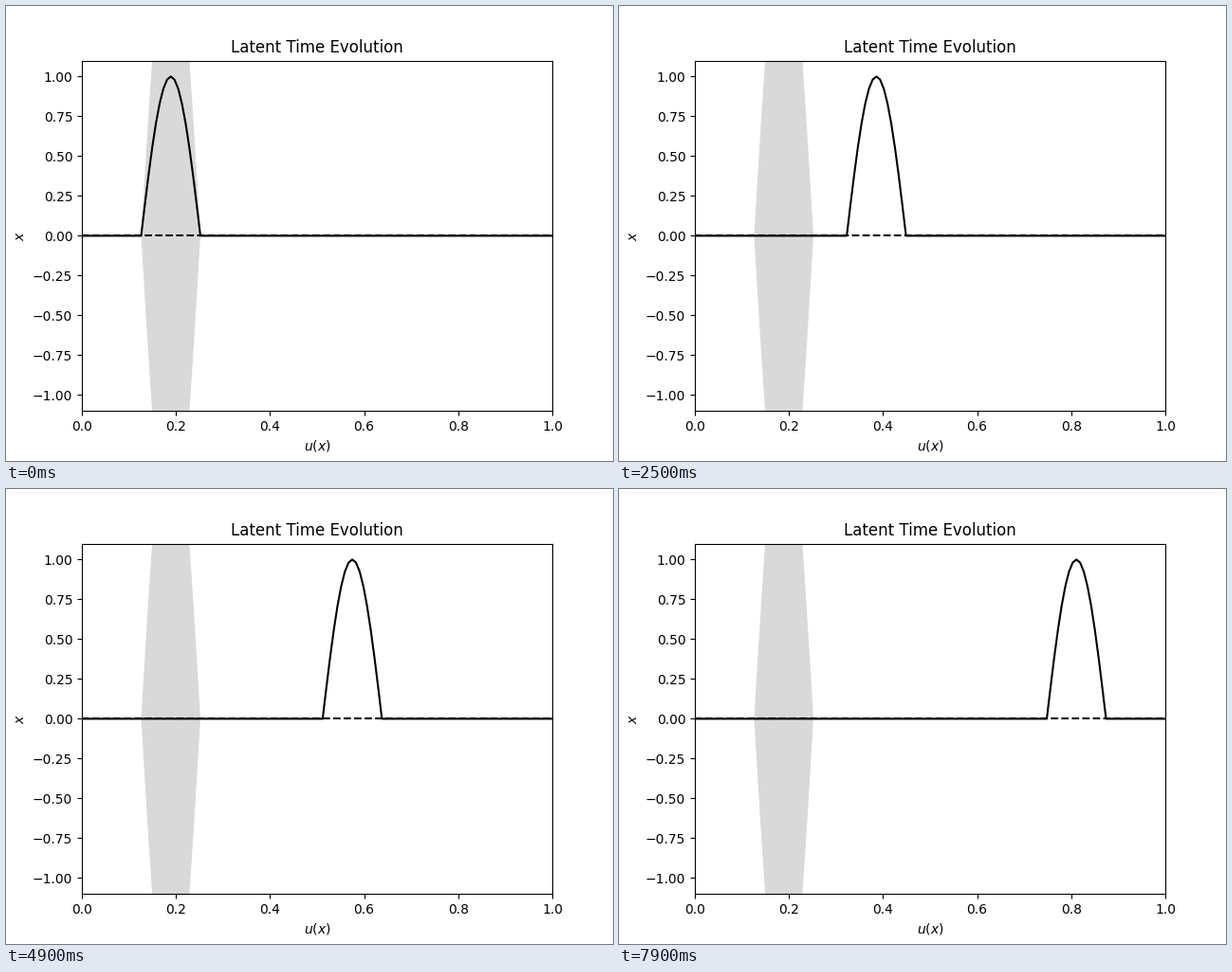
Recreate the animation shown at these times as a matplotlib script. Size 640x480 px, loop 8000 ms.

```python
import numpy as np
import matplotlib.pyplot as plt
from matplotlib.animation import FuncAnimation

CELLS = 127      # grid intervals on [0, 1]
START = 16       # left foot of the pulse at t = 0
WIDTH = 16       # pulse width in grid intervals
FRAMES = 80
INTERVAL = 100

index = np.arange(CELLS + 1)
x = index / CELLS


def pulse(step):
    """Half-sine pulse advected by one grid cell per step."""
    phase = (index - START - step) / WIDTH
    return np.where((phase > 0) & (phase < 1), np.sin(np.pi * phase), 0.0)


fig, ax = plt.subplots(figsize=(6.4, 4.8), dpi=100)
band = 2 * pulse(0)
ax.fill_between(x, -band, band, facecolor="black", alpha=0.15, linewidth=0)
wave, = ax.plot(x, pulse(0), color="black", lw=1.5)
ax.plot(x, np.zeros_like(x), color="black", ls="--", lw=1.5)

ax.set_xlim(0, 1)
ax.set_ylim(-1.1, 1.1)
ax.set_title("Latent Time Evolution")
ax.set_xlabel("$u(x)$")
ax.set_ylabel("$x$")


def update(step):
    wave.set_ydata(pulse(step))
    return wave,


anim = FuncAnimation(fig, update, frames=FRAMES, interval=INTERVAL,
                     repeat=True, repeat_delay=0)
plt.show()
```
